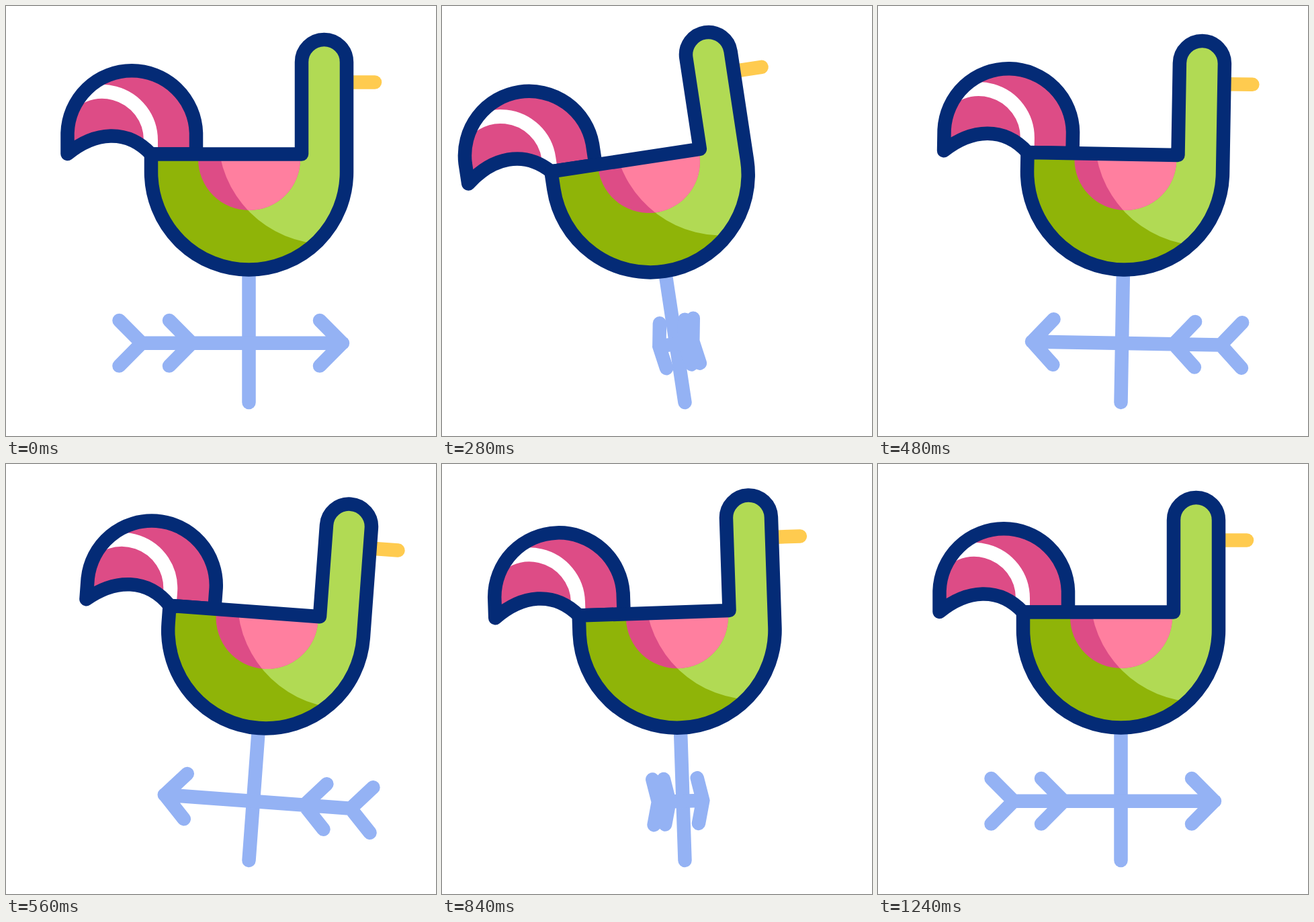
Animation, 640 px wide and 640 px high, one loop 2000 ms. Source, as an HTML page:

```html
<!DOCTYPE html>
<html lang="en">
<head>
<meta charset="utf-8">
<title>Weather vane</title>
<style>
  html, body { margin: 0; width: 100%; height: 100%; overflow: hidden; background: #fff; }
  svg { display: block; width: 100vw; height: 100vh; }
  .line { fill: none; stroke-width: 20.5; stroke-linecap: round; stroke-linejoin: round; }
  .iron { stroke: #94b2f4; }
  .navy { stroke: #042b76; }
</style>
</head>
<body>
<svg viewBox="0 0 640 640">
  <defs>
    <path id="tail" d="M91.5 220V189A95.8 95.8 0 0 1 283 189V220.5H216C180 182 132 187 91.5 220Z"/>
    <path id="body" d="M216 220.5V247A145.5 145.5 0 0 0 507 247V83.5A33.5 33.5 0 0 0 440 83.5V220.5Z"/>
    <path id="wing" d="M286 220H438V228A76 76 0 0 1 286 228Z"/>
    <clipPath id="inTail"><use href="#tail"/></clipPath>
    <clipPath id="inBody"><use href="#body"/></clipPath>
    <clipPath id="inWing"><use href="#wing"/></clipPath>
  </defs>
  <g id="vane">
    <path class="line iron" d="M361.5 390V590"/>
    <path class="line iron" id="arrow"/>
    <path class="line" stroke="#ffcb4f" d="M507 113.5H549"/>

    <use href="#tail" fill="#dd4c86"/>
    <path clip-path="url(#inTail)" fill="none" stroke="#fff" stroke-width="21"
          d="M80 164A72.5 72.5 0 0 1 215.5 200V226"/>
    <use href="#tail" class="line navy"/>

    <use href="#body" fill="#8fb408"/>
    <circle cx="477" cy="193" r="161.3" fill="#b1da54" clip-path="url(#inBody)"/>
    <use href="#wing" fill="#dd4c86"/>
    <circle cx="477" cy="193" r="161.3" fill="#ff7f9f" clip-path="url(#inWing)"/>
    <use href="#body" class="line navy"/>
  </g>
</svg>
<script>
  const LOOP = 2000, STEP = 40;
  const vane = document.getElementById('vane');
  const arrow = document.getElementById('arrow');

  // [time, value] keys: tilt in degrees, and the arrow's apparent width
  const TILT = [[0, 0], [280, -8.6], [600, 4.55], [880, -2.15], [1120, 0]];
  const TURN = [[0, 1], [510, -0.95], [1110, 1]];

  function ease(t) {
    const half = u => Math.pow(2 * u, 2.15) / 2;
    return t < 0.5 ? half(t) : 1 - half(1 - t);
  }

  function valueAt(keys, t) {
    for (let i = 1; i < keys.length; i++) {
      const [t0, a] = keys[i - 1], [t1, b] = keys[i];
      if (t < t1) return a + (b - a) * ease((t - t0) / (t1 - t0));
    }
    return keys[keys.length - 1][1];
  }

  // The arrow's points squeeze sideways while its line weight stays even
  function arrowPath(width) {
    const x = v => (360 + (v - 360) * width).toFixed(2);
    const chevron = (end, tip) => `M${x(end)} 468L${x(tip)} 501.8L${x(end)} 535.6`;
    return `M${x(202)} 501.8L${x(501)} 501.8` +
      chevron(168.5, 202) + chevron(243, 276.5) + chevron(467, 500.5);
  }

  function draw(time) {
    const t = Math.floor((time % LOOP) / STEP) * STEP;
    vane.setAttribute('transform', `rotate(${valueAt(TILT, t).toFixed(3)} 361.5 590)`);
    arrow.setAttribute('d', arrowPath(valueAt(TURN, t)));
  }

  let start = null;
  function tick(now) {
    if (start === null) start = now;
    draw(now - start);
    requestAnimationFrame(tick);
  }
  draw(0);
  requestAnimationFrame(tick);
</script>
</body>
</html>
```
